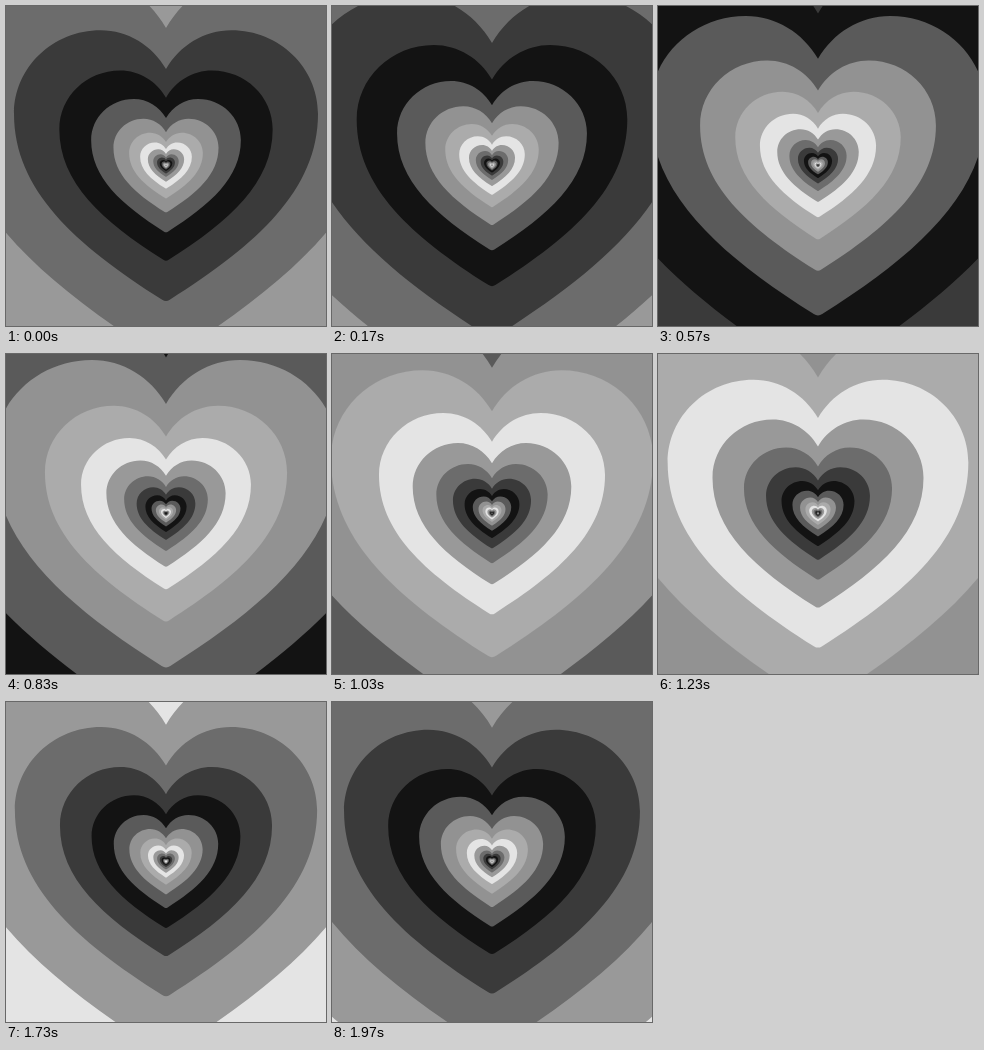
These frames come from a looping animation (320 px wide and 320 px high, 2010 ms). An HTML page with a canvas:

```html
<!DOCTYPE html>
<html lang="en">
<head>
<meta charset="utf-8">
<title>Endless hearts</title>
<style>
  html, body { margin: 0; width: 100%; height: 100%; overflow: hidden; background: #6c6c6c; }
  canvas { display: block; width: 320px; height: 320px; }
</style>
</head>
<body>
<canvas id="stage" width="320" height="320"></canvas>
<script>
const ctx = document.getElementById('stage').getContext('2d');

const LOOP = 2010;
const FRAMES = 60;
const RATE = 0.1343;        // rings travelled per frame
const RATIO = 1.425;        // size ratio between neighbouring rings
const BASE = 152;           // half width of ring 0 at the start
const CX = 160, CY = 159.5;
const GREYS = ['#3a3a3a', '#131313', '#5a5a5a', '#929292', '#ababab', '#e4e4e4', '#999999', '#6c6c6c'];

const grey = ring => GREYS[((ring % 8) + 8) % 8];

// Unit heart: half width 1, zoom centre at the origin
function makeHeart() {
  const h = new Path2D();
  h.moveTo(0, -0.635);
  h.bezierCurveTo(-0.09, -0.79, -0.25, -0.89, -0.43, -0.89);
  h.bezierCurveTo(-0.745, -0.89, -1, -0.645, -1, -0.34);
  h.bezierCurveTo(-1, 0.16, -0.6, 0.52, -0.025, 0.884);
  h.quadraticCurveTo(0, 0.9, 0.025, 0.884);
  h.bezierCurveTo(0.6, 0.52, 1, 0.16, 1, -0.34);
  h.bezierCurveTo(1, -0.645, 0.745, -0.89, 0.43, -0.89);
  h.bezierCurveTo(0.25, -0.89, 0.09, -0.79, 0, -0.635);
  h.closePath();
  return h;
}
const heart = makeHeart();

// 30 steps per second, snapped to 10 ms ticks
function frameAt(ms) {
  const tick = Math.floor((ms % LOOP) / 10) * 10;
  return Math.min(FRAMES - 1, Math.floor((tick + 5) * 0.03));
}

function draw(frame) {
  const phase = frame * RATE;
  let ring = Math.floor(phase) - 3;
  ctx.setTransform(1, 0, 0, 1, 0, 0);
  ctx.fillStyle = grey(ring);
  ctx.fillRect(0, 0, 320, 320);
  for (;;) {
    ring++;
    const size = BASE * RATIO ** (phase - ring);
    if (size < 1) break;
    ctx.setTransform(size, 0, 0, size, CX, CY);
    ctx.fillStyle = grey(ring);
    ctx.fill(heart);
  }
}

const start = performance.now();
function loop() {
  draw(frameAt(performance.now() - start));
  requestAnimationFrame(loop);
}
loop();
</script>
</body>
</html>
```
